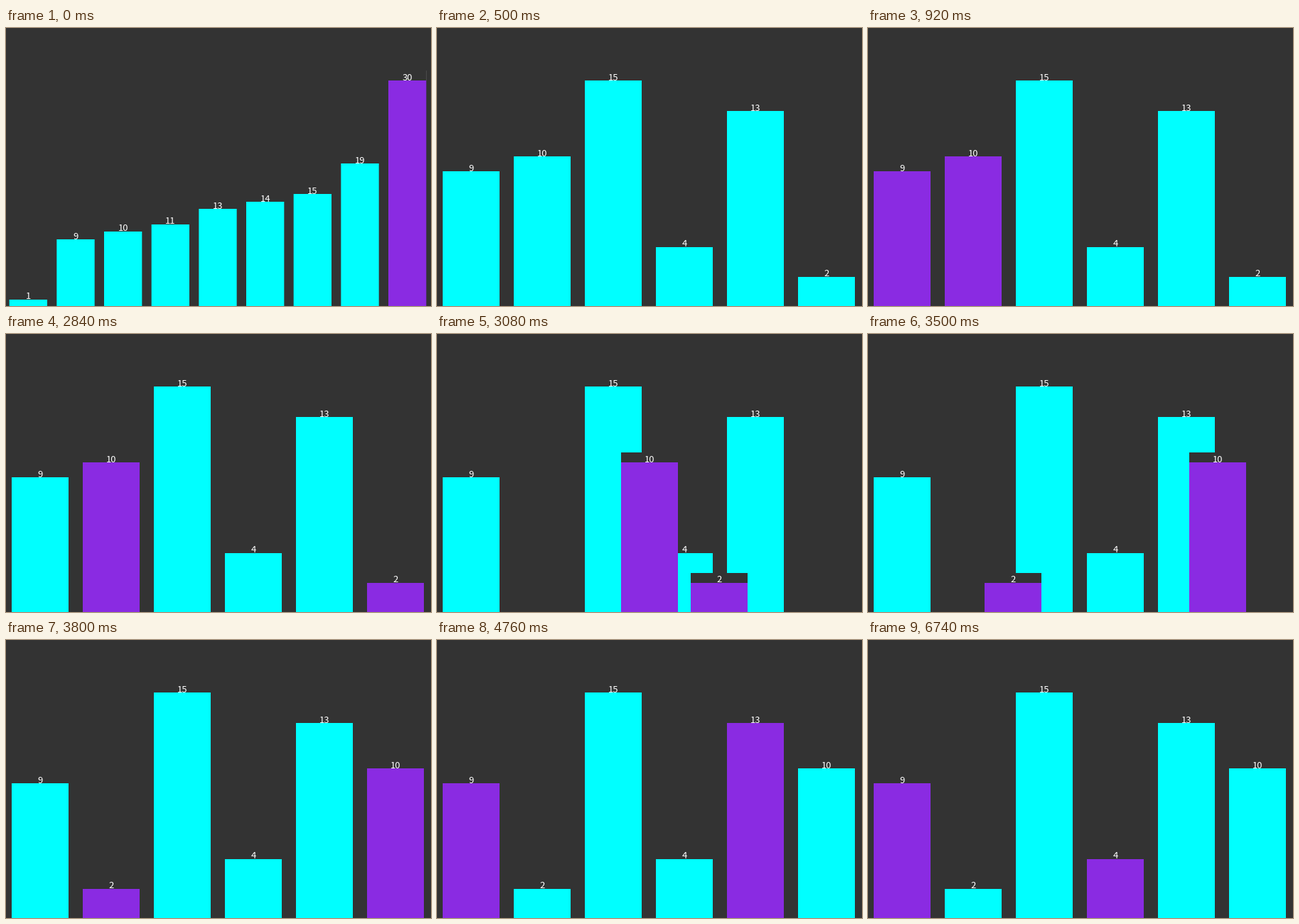
These frames come from a looping animation (598 px wide and 392 px high, 8 s). A matplotlib script:

```python
import matplotlib.pyplot as plt
from matplotlib.animation import FuncAnimation
from matplotlib.patches import Rectangle

W, H, DPI = 598, 392, 100
LOOP, TICK = 8000, 20
BACK, PLAIN, ACTIVE = "#333333", "#00ffff", "#8a2be2"
LABEL_H = 14

SORTED = [1, 9, 10, 11, 13, 14, 15, 19, 30]
BEFORE = [9, 10, 15, 4, 13, 2]
AFTER = [9, 2, 15, 4, 13, 10]
SWAP_START, SWAP_END, SWAP_STEP = 2840, 3800, 60

fig = plt.figure(figsize=(W / DPI, H / DPI), dpi=DPI, facecolor=BACK)
ax = fig.add_axes([0, 0, 1, 1])
ax.set_xlim(0, W)
ax.set_ylim(H, 0)
ax.axis("off")


def ease_out(t):
    """CSS ease-out: cubic-bezier(0, 0, 0.58, 1)."""
    lo, hi = 0.0, 1.0
    for _ in range(40):
        s = (lo + hi) / 2
        if 1.74 * s * s * (1 - s) + s ** 3 < t:
            lo = s
        else:
            hi = s
    return 3 * s * s * (1 - s) + s ** 3


def box(x, y, w, h, color):
    ax.add_patch(Rectangle((x, y), w, h, fc=color, lw=0, zorder=1, snap=False))


def bar(values, i, color, shift=0):
    pitch = 600 / len(values)
    x, w = pitch * 0.1 - 2 + shift + pitch * i, pitch * 0.8
    top = round(394 - 320 * values[i] / max(values))
    box(x, top - LABEL_H, w, LABEL_H, BACK)
    box(x, top, w, H - top, color)
    ax.text(x + w / 2, top - 0.5, str(values[i]), color="white", zorder=1,
            ha="center", va="baseline", family="Noto Sans CJK JP",
            size=13 * 72 / DPI)


def bars(values, active=(), shifts=None):
    """Draw the row, with the active bars above the others."""
    shifts = shifts or {}
    for i in sorted(range(len(values)), key=lambda i: i in active):
        bar(values, i, ACTIVE if i in active else PLAIN, shifts.get(i, 0))


def draw(frame):
    for artist in [*ax.patches, *ax.texts]:
        artist.remove()
    t = frame * TICK
    if t < 500:
        bars(SORTED, [8])
        box(591, 60, 1, LABEL_H, "#4a4a4a")
    elif t < 920:
        bars(BEFORE)
    elif t < SWAP_START:
        bars(BEFORE, [0, 1])
    elif t < SWAP_END:
        elapsed = (t - SWAP_START) // SWAP_STEP * SWAP_STEP
        d = round(400 * ease_out(elapsed / (SWAP_END - SWAP_START)))
        bars(BEFORE, [1, 5], {1: d, 5: -d})
    elif t < 4760:
        bars(AFTER, [1, 5])
    elif t < 6740:
        bars(AFTER, [0, 4])
    else:
        bars(AFTER, [0, 3])
    return [*ax.patches, *ax.texts]


anim = FuncAnimation(fig, draw, frames=LOOP // TICK, interval=TICK,
                     init_func=lambda: [], repeat=True, repeat_delay=0)
plt.show()
```
